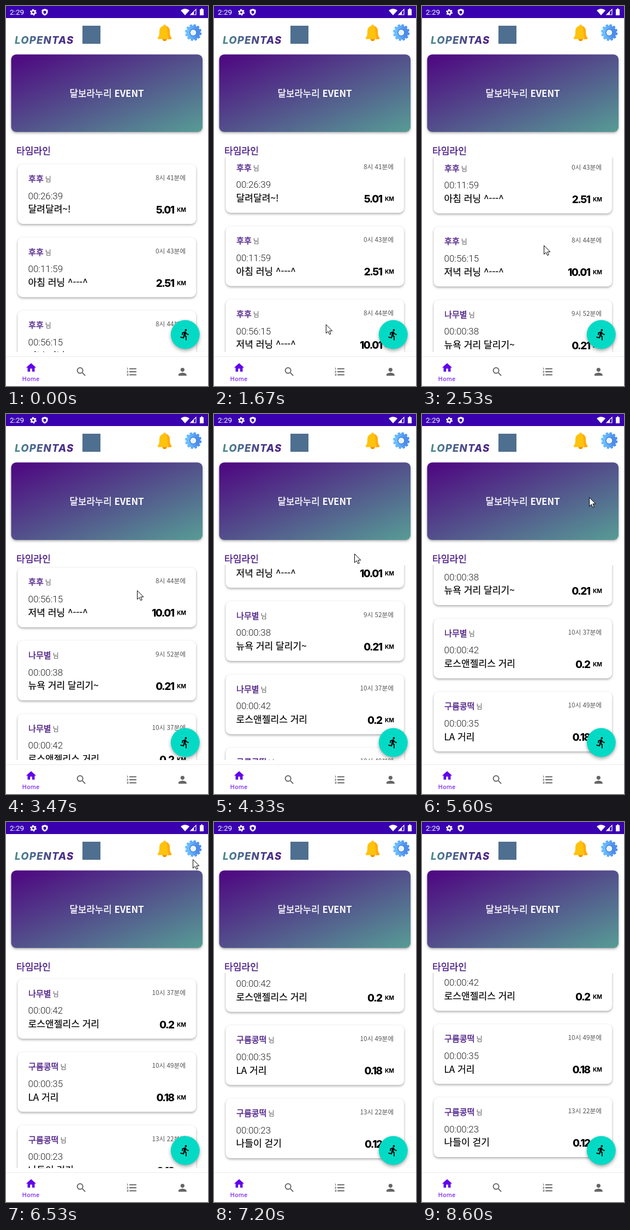
An HTML page that plays this animation: 370x694 px, repeating every 8.67 s.

```html
<!DOCTYPE html>
<html lang="ko">
<head>
<meta charset="utf-8">
<style>
html, body { margin: 0; width: 100%; height: 100%; overflow: hidden; background: #fff; }
svg { display: block; width: 100vw; height: 100vh; font-family: 'Noto Sans CJK KR', 'Noto Sans CJK', sans-serif; }
.shadow { filter: drop-shadow(0 2px 2px #0005); }
.roboto { font-family: Roboto, sans-serif; }
.purple { font-weight: 500; fill: #4a1a84; stroke: #4a1a84; stroke-width: .35px; }
.name { font-size: 15.1px; }
.suffix { font-size: 12px; font-weight: 400; fill: #555; stroke: none; }
.ago { font-size: 11.7px; font-weight: 300; fill: #555; text-anchor: end; }
.time { font: 300 17px Roboto, sans-serif; fill: #222; }
.title { font-size: 17.1px; stroke: #000; stroke-width: .2px; }
.km { font: 800 18.8px Inter, sans-serif; letter-spacing: -1.5px; text-anchor: end; }
.unit { font: 700 10.4px Inter, sans-serif; letter-spacing: -.3px; }
</style>
</head>
<body>
<svg viewBox="0 0 370 694">
  <defs>
    <linearGradient id="banner" x2="1" y2="1">
      <stop offset=".05" stop-color="#4f0c82"/><stop offset="1" stop-color="#579c96"/>
    </linearGradient>
    <linearGradient id="word"><stop stop-color="#4b8a90"/><stop offset="1" stop-color="#4a1a84"/></linearGradient>
    <linearGradient id="blue"><stop stop-color="#6cc0ff"/><stop offset="1" stop-color="#4a8aec"/></linearGradient>
    <clipPath id="window"><path d="M0 276H370V632H0Z"/></clipPath>
  </defs>

  <path d="M0 0H370V22H0Z" fill="#3a00b0"/>
  <path d="M0 0H5Q0 0 0 5ZM370 0H365Q370 0 370 5Z" fill="#222"/>
  <g fill="#fff">
    <text class="roboto" x="7" y="16" font-size="13.6">2:29</text>
    <circle cx="50" cy="11.5" r="3.3" fill="none" stroke="#fff" stroke-width="2.6"/>
    <circle cx="50" cy="11.5" r="5.2" fill="none" stroke="#fff" stroke-width="1.7" stroke-dasharray="2.7 2.745"/>
    <path d="M71 5l5.5 2v4c0 3-2.5 5.5-5.5 6.5c-3-1-5.5-3.5-5.5-6.5V7z"/>
    <path d="M71 8.5l2.5 1v2c0 1.5-1 2.5-2.5 3c-1.5-.5-2.5-1.5-2.5-3v-2z" fill="#3a00b0"/>
    <path d="M320 8Q328 2 336 8L328 17Z"/>
    <path d="M338 16L348 6V16Z" fill="none" stroke="#fff" stroke-width="1.2"/><path d="M338 16L344 10V16Z"/>
    <path d="M355 6h2V4.5h3V6h2v11h-7z"/>
  </g>

  <text x="16" y="68.5" font-family="Inter, sans-serif" font-size="18.5" font-weight="800" font-style="italic" letter-spacing="1.2" fill="url(#word)">LOPENTAS</text>
  <path d="M140 36h33v33h-33z" fill="#4f6f90"/>

  <circle cx="290.5" cy="60" r="4" fill="#f28c00"/>
  <path d="M290.5 34c2 0 2.5 1 2.5 2.5c5 1.2 7 5 7 10c0 7 1 9 3 11.5c.7 1.5 0 2.5-1 2.5H279c-1.2 0-1.8-1-1-2.5c2-2.5 3-4.5 3-11.5c0-5 2-8.8 7-10c0-1.5.5-2.5 2.5-2.5z" fill="#ffc20e"/>
  <path d="M293 36.5c5 1.2 7 5 7 10c0 7 1 9 3 11.5c.7 1.5 0 2.5-1 2.5h-5c-1-8 0-17-4-24z" fill="#ffad05"/>

  <g fill="none" stroke="url(#blue)">
    <circle cx="343" cy="48.5" r="9" stroke-width="7.5"/>
    <circle cx="343" cy="48.5" r="13.3" stroke-width="3.8" stroke-dasharray="4.4 2.564"/>
    <circle cx="343" cy="48.5" r="6" stroke="#3f77d6" stroke-width="1.3"/>
  </g>
  <circle cx="343" cy="48.5" r="5.3" fill="#eaf4ff"/>

  <rect class="shadow" x="9.5" y="88.5" width="350.5" height="141.5" rx="9" fill="url(#banner)"/>
  <text x="184.5" y="165.5" font-size="16.8" font-weight="500" fill="#fff" stroke="#fff" stroke-width=".35" text-anchor="middle">달보라누리 <tspan font-weight="700" stroke="none">EVENT</tspan></text>
  <text class="purple" x="19" y="271" font-size="17.1">타임라인</text>

  <g clip-path="url(#window)"><g id="list"></g></g>

  <circle cx="328.3" cy="600" r="26.5" fill="#03dac5" style="filter: drop-shadow(0 3px 3px #0005)"/>
  <path d="M0 640H370V641H0Z" fill="#ececec"/>
  <g id="icons"></g>
  <text class="roboto" x="29.8" y="685" font-size="11" letter-spacing=".55" fill="#6200ee">Home</text>
  <path id="cursor" d="M.5 .5V16.5L4.2 13L6.7 18.5L9.2 17.4L6.8 12H11.8Z" fill="#fff" stroke="#000"/>
</svg>
<script>
const $ = id => document.getElementById(id);

const runs = [
  ['후후', '8시 41분에', '00:26:39', '달려달려~!', '5.01'],
  ['후후', '0시 43분에', '00:11:59', '아침 러닝 ^---^', '2.51'],
  ['후후', '8시 44분에', '00:56:15', '저녁 러닝 ^---^', '10.01'],
  ['나무별', '9시 52분에', '00:00:38', '뉴욕 거리 달리기~', '0.21'],
  ['나무별', '10시 37분에', '00:00:42', '로스앤젤리스 거리', '0.2'],
  ['구름콩떡', '10시 49분에', '00:00:35', 'LA 거리', '0.18'],
  ['구름콩떡', '13시 22분에', '00:00:23', '나들이 걷기', '0.12'],
];
$('list').innerHTML = runs.map(([name, ago, time, title, km], i) => `
  <g transform="translate(0 ${289 + i * 133.67})">
    <rect class="shadow" x="21.5" width="326.5" height="109" rx="9" fill="#fff"/>
    <text class="purple name" x="41" y="32">${name}<tspan class="suffix" dx="3">님</tspan></text>
    <text class="ago" x="329" y="29">${ago}</text>
    <text class="time" x="40.5" y="63.5">${time}</text>
    <text class="title" x="40.5" y="88.3">${title}</text>
    <text class="km" x="307.5" y="90">${km}</text>
    <text class="unit" x="313" y="87">KM</text>
  </g>`).join('');

// Icons on a 24-unit grid: centre x, centre y, scale, colour, path
$('icons').innerHTML = [
  [46, 660.5, .92, '#6200ee', 'M10 20v-6h4v6h5v-8h3L12 3 2 12h3v8z'],
  [138, 668, .92, '#666', 'M15.5 14h-.79l-.28-.27C15.41 12.59 16 11.11 16 9.5 16 5.91 13.09 3 9.5 3S3 5.91 3 9.5 5.91 16 9.5 16c1.61 0 3.09-.59 4.23-1.57l.27.28v.79l5 4.99L20.49 19l-4.99-5zm-6 0C7.01 14 5 11.99 5 9.5S7.01 5 9.5 5 14 7.01 14 9.5 11.99 14 9.5 14z'],
  [230.5, 668, .92, '#666', 'M2 17h2v.5H3v1h1v.5H2v1h3v-4H2v1zm1-9h1V4H2v1h1v3zm-1 3h1.8L2 13.1v.9h3v-1H3.2L5 10.9V10H2v1zm5-6v2h14V5H7zm0 14h14v-2H7v2zm0-6h14v-2H7v2z'],
  [323.3, 668, .92, '#666', 'M12 12c2.21 0 4-1.79 4-4s-1.79-4-4-4-4 1.79-4 4 1.79 4 4 4zm0 2c-2.67 0-8 1.34-8 4v2h16v-2c0-2.66-5.33-4-8-4z'],
  [328, 600, .95, '#000', 'M13.49 5.48c1.1 0 2-.9 2-2s-.9-2-2-2-2 .9-2 2 .9 2 2 2zm-3.6 13.9l1-4.4 2.1 2v6h2v-7.5l-2.1-2 .6-3c1.3 1.5 3.3 2.5 5.5 2.5v-2c-1.9 0-3.5-1-4.3-2.4l-1-1.6c-.4-.6-1-1-1.7-1-.3 0-.5.1-.8.1l-5.2 2.2v4.7h2v-3.4l1.8-.7-1.6 8.1-4.9-1-.4 2 7 1.4z'],
].map(([x, y, k, fill, d]) =>
  `<path transform="translate(${x} ${y}) scale(${k}) translate(-12 -12)" fill="${fill}" d="${d}"/>`).join('');

// Keys: time, cursor x, cursor y, scroll offset
const enter = [[267, 345, 540, 0], [530, 280, 474, 0], [1000, 202, 604, 0], [1333, 202, 604, 0]];
const drag = [
  [1333, 202, 604, 0], [2533, 223, 437, 153], [3467, 240, 322, 276], [4000, 251, 274, 326],
  [4333, 257, 255, 348], [4933, 282, 196, 407], [5600, 306, 152, 450], [5800, 312, 131, 471],
  [6533, 342, 68, 537], [6733, 349, 54, 553], [7200, 370, 22, 586],
];
const leave = [[8133, 366, 562, 588], [8330, 353, 585, 588], [8600, 366, 601, 588]];

// Smooth curve through the keys, at rest at both ends
function along(keys, t) {
  const i = Math.max(1, keys.findIndex(k => k[0] >= t));
  const a = keys[i - 1], b = keys[i], span = b[0] - a[0];
  const u = Math.max(0, (t - a[0]) / span);
  const slope = (j, c) => keys[j - 1] && keys[j + 1]
    ? (keys[j + 1][c] - keys[j - 1][c]) / (keys[j + 1][0] - keys[j - 1][0]) : 0;
  return [1, 2, 3].map(c =>
    a[c] + (b[c] - a[c]) * u * u * (3 - 2 * u) +
    span * u * (1 - u) * (slope(i - 1, c) * (1 - u) - slope(i, c) * u));
}

function pose(t) {
  if (t < 265) return [-50, 0, 0];
  if (t < 1333) return along(enter, t);
  if (t < 7190) return along(drag, t);
  if (t > 8130 && t < 8595) return along(leave, t);
  return [-50, 0, t < 7530 ? 586 : t < 7598 ? 587 : 588];
}

function draw(now) {
  // The screen refreshes 15 times a second
  const t = Math.floor((now % 8670 + 3.4) * .015) / .015;
  const [x, y, scroll] = pose(t);
  $('cursor').setAttribute('transform', `translate(${x} ${y})`);
  $('list').setAttribute('transform', `translate(0 ${-scroll})`);
  requestAnimationFrame(draw);
}
draw(0);
</script>
</body>
</html>
```
